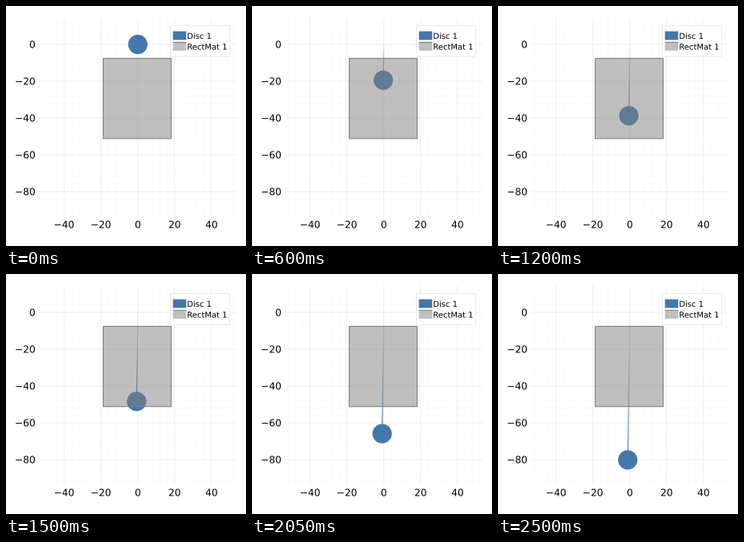
Recreate the animation shown at these times as a matplotlib script. Size 300x300 px, loop 2.55 s.

```python
import numpy as np
import matplotlib.pyplot as plt
from matplotlib.animation import FuncAnimation
from matplotlib.collections import LineCollection
from matplotlib.colors import to_rgb
from matplotlib.patches import Circle, PathPatch, Rectangle
from matplotlib.textpath import TextPath
from matplotlib.transforms import Affine2D

SIZE, DPI = 300, 100
FRAMES, STEP_MS = 51, 50
SCALE = 2.3                 # pixels per data unit
X0, Y0 = 164.8, 48.0        # pixel position of the data origin
LEFT, RIGHT, TOP, BOTTOM = 41, 288, 15, 264
BLUE, GRAY = "#4477aa", "#808080"

plt.rcParams["font.family"] = "DejaVu Sans"


def px(width):
    """Convert pixels to points."""
    return width * 72 / DPI


def to_pixels(x, y):
    return X0 + SCALE * x, Y0 - SCALE * y


def position(n):
    """Disc centre in pixels after n steps: a fall with slight drag."""
    return to_pixels(-0.0225 * n, -1.6267 * n + 0.000466 * n * n)


fig = plt.figure(figsize=(SIZE / DPI, SIZE / DPI), dpi=DPI, facecolor="white")
ax = fig.add_axes([0, 0, 1, 1])
ax.set_xlim(0, SIZE)
ax.set_ylim(SIZE, 0)
ax.axis("off")


def label(x, y, text, size, align="left"):
    """Draw unhinted text with its baseline at y."""
    path = TextPath((0, 0), text, size=size)
    box = path.get_extents()
    shift = {"left": 0, "center": (box.x0 + box.x1) / 2, "right": box.x1}[align]
    place = Affine2D().translate(-shift, 0).scale(1, -1).translate(x, y)
    ax.add_patch(PathPatch(place.transform_path(path), fc="black", ec="none",
                           snap=False, zorder=8))


def rect(x0, y0, x1, y1, **style):
    style = {"fc": "none", "ec": "none", "snap": False, **style}
    ax.add_patch(Rectangle((x0, y0), x1 - x0, y1 - y0, **style))


def grid_line(value, vertical):
    major = value % 20 == 0
    style = dict(color="black", lw=px(0.7), zorder=1, snap=False,
                 alpha=0.09 if major else 0.055,
                 ls="-" if major else (0, (1.5, 2)))
    x, y = to_pixels(value, value)
    if vertical:
        ax.plot([x, x], [TOP, BOTTOM], **style)
    else:
        ax.plot([LEFT, RIGHT], [y, y], **style)


for v in range(-52, 53, 4):
    grid_line(v, True)
for v in range(-92, 13, 4):
    grid_line(v, False)

for v in range(-40, 41, 20):
    label(to_pixels(v, 0)[0], 277.5, str(v).replace("-", "\u2212"), 12.2, "center")
for v in range(-80, 1, 20):
    label(36, to_pixels(0, v)[1] + 4.4, str(v).replace("-", "\u2212"), 12.2, "right")

trail = LineCollection([], linewidths=px(1.2), zorder=2, capstyle="butt")
ax.add_collection(trail)
disc = Circle((X0, Y0), 12.1, fc=BLUE, ec="none", zorder=3)
ax.add_patch(disc)

# translucent mat in front of the disc
mat = 121.5, 65.4, 206.5, 165.7
rect(*mat, fc=GRAY, alpha=0.5, zorder=4)
rect(*mat, ec=GRAY, lw=px(1.1), zorder=5)

# legend
rect(205.5, 24.4, 279.7, 63.5, fc="white", ec="#ebebeb", lw=px(1), zorder=6)
rect(208.7, 31.6, 225.3, 42.4, fc=BLUE, zorder=7)
rect(208.7, 45.3, 225.3, 55.8, fc="#bfbfbf", zorder=7)
ax.plot([208.7, 225.3], [45.4, 45.4], color=GRAY, lw=px(1.1), zorder=7,
        solid_capstyle="butt", snap=False)
label(226.3, 41, "Disc 1", 10)
label(226.3, 54.5, "RectMat 1", 10)


def update(n):
    path = np.array([position(k) for k in range(n + 1)])
    trail.set_segments(np.stack([path[:-1], path[1:]], axis=1))
    fade = np.linspace(0, 1, n + 1)[1:]
    trail.set_color([(*to_rgb(BLUE), a) for a in fade])
    disc.center = position(n)
    return trail, disc


anim = FuncAnimation(fig, update, frames=FRAMES, interval=STEP_MS,
                     repeat=True, repeat_delay=0)
plt.show()
```
